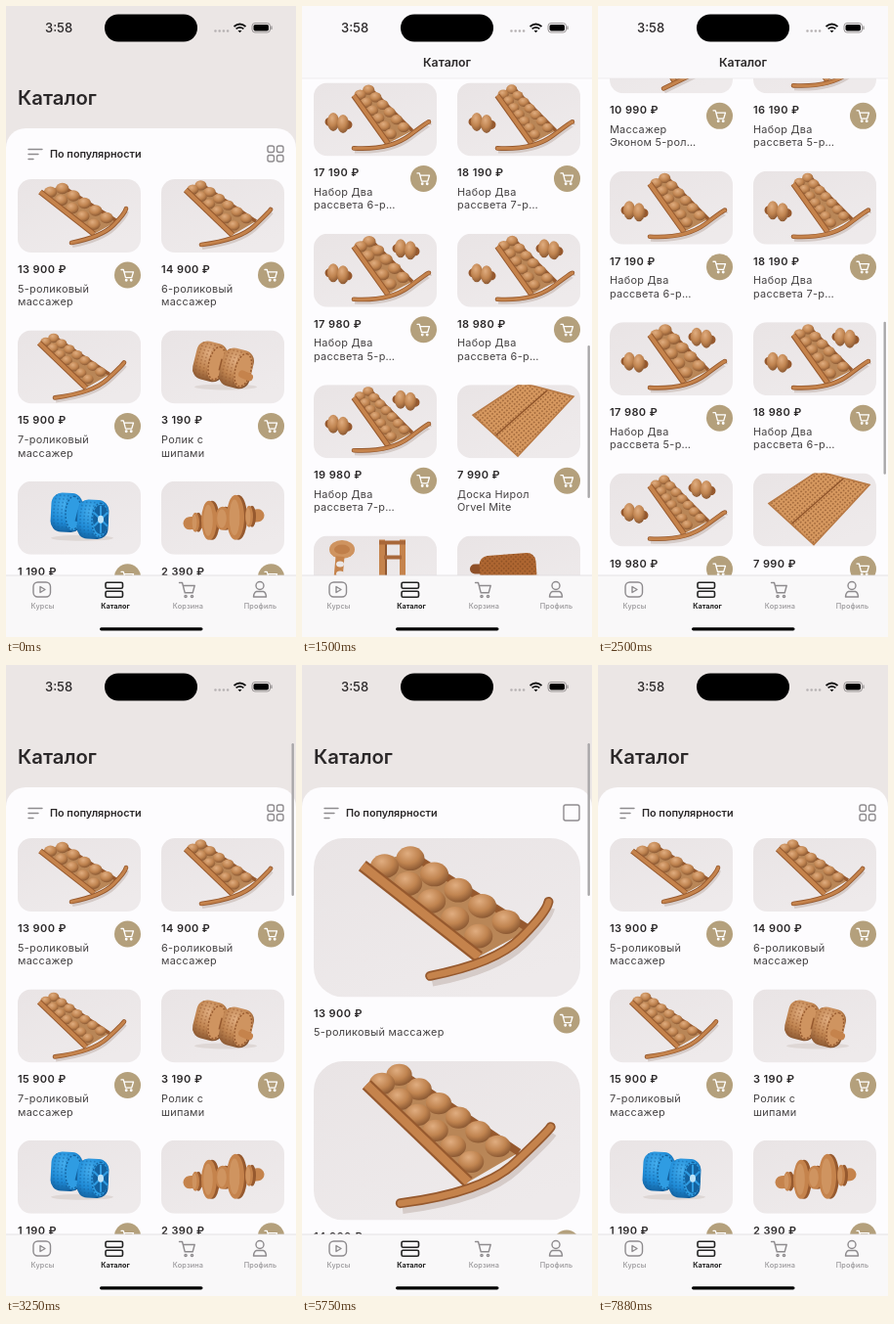
These frames come from a looping animation (297x645 px, 8000 ms). An HTML page:

```html
<!DOCTYPE html>
<html lang="ru">
<head>
<meta charset="utf-8">
<title>Каталог</title>
<style>
html, body { margin: 0; width: 100%; height: 100%; overflow: hidden; background: #fdfcfe; }
svg { display: block; width: 100vw; height: 100vh; }
text { font-family: Inter, "Noto Sans", sans-serif; fill: #2b2829; }
.price { font-size: 11px; font-weight: 600; letter-spacing: .4px; }
.name { font-size: 10.9px; letter-spacing: .28px; fill: #454243; }
.tab { font-size: 7.3px; font-weight: 500; letter-spacing: .15px; text-anchor: middle; fill: #979598; }
.tab.on { font-weight: 700; fill: #222; letter-spacing: 0; }
.icon { fill: none; stroke: #8e8b8e; stroke-width: 1.4; stroke-linecap: round; stroke-linejoin: round; }
.icon.on { stroke: #222; stroke-width: 1.6; }
</style>
</head>
<body>
<svg viewBox="0 0 297 645">
  <defs>
    <clipPath id="clip"><rect width="126" height="75" rx="14"/></clipPath>
    <linearGradient id="photo" x2=".6" y2="1"><stop stop-color="#e9e4e5"/><stop offset="1" stop-color="#eeeaeb"/></linearGradient>
    <radialGradient id="wood" cx=".4" cy=".3" r=".75"><stop stop-color="#e0ad80"/><stop offset=".55" stop-color="#c08450"/><stop offset="1" stop-color="#84532f"/></radialGradient>
    <radialGradient id="blue" cx=".4" cy=".3" r=".75"><stop stop-color="#45aeee"/><stop offset=".6" stop-color="#1f8bd6"/><stop offset="1" stop-color="#115c99"/></radialGradient>
    <pattern id="dots" width="3.4" height="3.4" patternUnits="userSpaceOnUse" patternTransform="rotate(-40)"><circle cx="1.7" cy="1.7" r=".95" fill="#74401b" opacity=".6"/></pattern>
    <g id="cart"><circle r="13.5" fill="#b4a07c"/><g fill="none" stroke="#fff" stroke-width="1.3" stroke-linecap="round" stroke-linejoin="round"><path d="M-6.5-5.5h2.3L-2 2.7h6.2L6-3.2h-9.5"/><circle cx="-1.3" cy="5.3" r=".8"/><circle cx="3.7" cy="5.3" r=".8"/></g></g>
  </defs>
  <rect width="297" height="645" fill="#ebe6e5"/>
  <g id="page">
    <text x="12" y="101" font-size="20.3" font-weight="600">Каталог</text>
    <rect y="125" width="297" height="2600" rx="20" fill="#fdfcfe"/>
    <path class="icon" d="M23 146.500h14M23 151.500h10M23 156.500h5"/>
    <text x="45" y="155" font-size="10.800" font-weight="600">По популярности</text>
    <g id="grid"></g><g id="big"></g><g id="list"></g>
  </g>
  <g id="nav">
    <rect width="297" height="74" fill="#faf9fb"/>
    <path d="M0 74h297" stroke="#e4e2e5" stroke-width=".6"/>
    <text x="148.500" y="62" font-size="12.300" font-weight="600" text-anchor="middle">Каталог</text>
  </g>
  <rect id="thumb" x="292.500" width="2.400" height="156" rx="1.200" fill="#a9a7a9"/>
  <text x="40" y="27" font-size="13" font-weight="500">3:58</text>
  <rect x="101" y="8.500" width="95" height="28" rx="14"/>
  <path d="M214.500 25.500h14" stroke="#b5b1b2" stroke-width="2.600" stroke-linecap="round" stroke-dasharray="0 4.200"/>
  <g fill="none" stroke="#111" stroke-width="1.800"><path d="M233.500 21q6-5 12 0M235.600 23.400q3.900-3 7.800 0"/><path d="M237.500 25l2 2.200 2-2.200z" fill="#111" stroke="none"/></g>
  <rect x="252" y="17.500" width="18.500" height="9.500" rx="3" fill="none" stroke="#8f8b8c" stroke-width=".9"/>
  <rect x="253.500" y="19" width="15.500" height="6.500" rx="1.800"/>
  <path d="M272 20.500v3.500" stroke="#8f8b8c" stroke-width="1.200"/>
  <rect y="582" width="297" height="63" fill="#f9f8f9"/>
  <path d="M0 582h297" stroke="#dddbdd" stroke-width=".8"/>
  <rect class="icon" x="28" y="589" width="17.500" height="15" rx="4.500"/>
  <path class="icon" d="M35 593.500v6l5-3z"/>
  <g class="icon on"><rect x="102" y="589.300" width="17.500" height="6" rx="1.500"/><rect x="102" y="598.300" width="17.500" height="6" rx="1.500"/></g>
  <g class="icon"><path d="M177.500 589.500h3l2.700 10.200h8l2-7.200h-12"/><circle cx="184" cy="603.500" r="1.100"/><circle cx="190.500" cy="603.500" r="1.100"/></g>
  <g class="icon"><circle cx="260" cy="592.500" r="4"/><path d="M256.500 598.500h7q2.800 1 3 5.500h-13q.2-4.500 3-5.500z"/></g>
  <text class="tab" x="37.500" y="616">Курсы</text>
  <text class="tab on" x="112" y="616">Каталог</text>
  <text class="tab" x="186.500" y="616">Корзина</text>
  <text class="tab" x="260.500" y="616">Профиль</text>
  <rect x="96" y="635.200" width="105.500" height="3.300" rx="1.650"/>
</svg>
<script>
const $ = id => document.getElementById(id);
const WOOD = { fill: 'url(#wood)', rail: '#c5834c', dark: '#96592e', face: '#cf9460', floor: '#b98657' };
const BLUE = { fill: 'url(#blue)', rail: '#2f9bdc', dark: '#14629f', face: '#2f9ce2', floor: '#cfe2ee' };

const stroke = (d, color, width, extra = '') =>
  `<path d="${d}" fill="none" stroke="${color}" stroke-width="${width}" ${extra}/>`;
const ROUND = 'stroke-linecap="round"';
const oval = (x, y, rx, ry, fill, extra = '') =>
  `<ellipse cx="${x}" cy="${y}" rx="${rx}" ry="${ry}" fill="${fill}" ${extra}/>`;
const move = (x, y, art) => `<g transform="translate(${x} ${y})">${art}</g>`;
const mix = (a, b, t) => a + (b - a) * t;

// Two rails with pairs of balls between them and a crossbar at the lower end.
const WIDE = { near: [23, 13, 78, 56], far: [45, 7, 102, 43], bar: 'M55 65Q86 59 98 47T111 30' };
const SLIM = { near: [25, 11, 73, 57], far: [39, 4, 97, 43], bar: 'M41 67Q80 62 95 48T112 31' };
const KIT = { near: [41, 13, 76, 62], far: [56, 4, 101, 49], bar: 'M41 67Q78 69 98 54T118 40' };
const PLAIN = { near: [36, 7, 67, 64], far: [54, 3, 89, 52], bar: 'M55 70L98 49' };
function board(n, { near, far, bar }, c = WOOD, filler = c.fill) {
  const rail = ([a, b, x, y]) => `M${a} ${b}L${x} ${y}`;
  const r = 2.6 + 18 / n;
  let balls = '';
  for (let i = 0; i < n; i++) for (const side of [.8, .25]) {
    const t = (i + .45) / n;
    const at = k => mix(mix(near[k], near[k + 2], t), mix(far[k], far[k + 2], t), side);
    balls += oval(at(0), at(1) - 2, r * 1.08, r * .92, filler);
  }
  const floor = `<path d="${rail(near)}L${far[2]} ${far[3]}L${far[0]} ${far[1]}z" fill="${c.floor}"/>`;
  return stroke(bar, '#d5cbc8', 4, 'transform="translate(1 3)"') + floor +
    stroke(rail(far), c.dark, 3.5) + balls + stroke(rail(near), c.dark, 6) +
    stroke(rail(near), c.rail, 4) + stroke(bar, c.dark, 4.6, ROUND) + stroke(bar, c.rail, 3, ROUND);
}

const roller = (x, y, c = WOOD) => stroke(`M${x - 9} ${y - 1}L${x + 10} ${y + 2}`, c.dark, 9, ROUND) +
  oval(x - 5, y - 1, 6, 9.5, c.fill) + oval(x + 5, y + 1, 6, 9.5, c.fill);

const kit = (n, extra, c, filler) => board(n, KIT, c, filler) +
  roller(25, 41, c) + (extra ? roller(94, 16, c) : '');

const wheel = (x, y, c, turn) => `<g transform="translate(${x} ${y}) rotate(${turn})">
  <rect x="-16" y="-20" width="32" height="40" rx="11" fill="${c.fill}"/>
  ${[-11, -7, -3, 1].map(k => stroke(`M${k} -18Q${k - 4} 0 ${k} 18`, c.dark, 1.6, 'stroke-dasharray="1.6 2" opacity=".5"')).join('')}
  ${oval(7, 0, 9, 18, c.face)}${stroke('M7-17A8 17 0 0 1 7 17A8 17 0 0 1 7-17', c.dark, 1.4, 'stroke-dasharray="2 1.6"')}</g>`;

const spiked = (c, turn) => oval(66, 58, 32, 3, '#ded7d5') + wheel(50, 32, c, turn) +
  stroke('M60 35L72 38', c.dark, 12) + wheel(77, 39, c, turn) +
  (c === BLUE
    ? oval(85, 39, 8, 15, c.dark) + stroke('M85 25V53M78 32L92 46M92 32L78 46', c.face, 2) + oval(85, 39, 3, 4, '#bfe3f7')
    : stroke('M83 45L90 48', c.rail, 8, ROUND));

const disc = (x, y, rx, ry) => oval(x + 2, y, rx, ry, WOOD.dark) + oval(x - 1, y, rx, ry, WOOD.rail) +
  oval(x - 2, y, rx * .6, ry * .8, WOOD.face);
const discs = stroke('M29 43L99 35', WOOD.rail, 13, ROUND) +
  [[36, 42, 4, 10], [50, 40, 8, 20], [64, 38, 8, 12], [77, 37, 9, 23], [91, 36, 4, 11]].map(d => disc(...d)).join('');

const relief = `<rect width="126" height="75" fill="${WOOD.dark}"/><g transform="rotate(12 63 38)">` +
  [8, 34, 62, 92, 118].map((x, i) => disc(x, 36 - i % 2 * 6, 15, 40)).join('') + '</g>';

const panel = 'M16 31L66-2L119 12L62 73Z';
const nails = `<path d="${panel}" fill="#d6985f"/><path d="${panel}" fill="url(#dots)"/>` +
  stroke('M39 52L93 5', '#8b5027', 1.2) + stroke(panel, '#b87a46', 1.6);

const stand = oval(29, 14, 13, 9.5, '#cf9460') + oval(29, 14, 8, 5, '#c07f4a') + stroke('M27 21L24 55', '#c5834c', 9) +
  [29, 39, 49].map(y => oval(27, y, 4, 3, '#ebe6e5')).join('') +
  stroke('M70 4V68M91 4V66', '#c5834c', 6) + stroke('M74 6V66', '#8f5730', 2) + stroke('M67 7H94M72 22H90M66 62H97', '#a9683a', 4);

const feet = stroke('M18 34H30', '#8f5028', 10, ROUND) +
  `<g transform="rotate(-4 50 34)"><rect x="23" y="19" width="58" height="30" rx="9" fill="#ae6631"/><rect x="23" y="19" width="58" height="30" rx="9" fill="url(#dots)"/></g>` +
  oval(80, 46, 12, 6, '#cb8f5a') + oval(102, 47, 13, 6, '#bf814b') + oval(80, 45, 4, 2, '#ead0b4') + oval(102, 46, 5, 2, '#ead0b4');

// Price, title with grid line break, picture.
const items = [
  ['13 900', '5-роликовый|массажер', board(5, WIDE)],
  ['14 900', '6-роликовый|массажер', board(6, SLIM)],
  ['15 900', '7-роликовый|массажер', move(-3, 2, board(7, SLIM))],
  ['3 190', 'Ролик с|шипами', spiked(WOOD, 14)],
  ['1 190', 'Ролик с|шипами из…', spiked(BLUE, 3)],
  ['2 390', 'Фигурный|ролик', discs],
  ['2 190', 'Гладкий|ролик', discs],
  ['2 590', 'Ролик|двойной', spiked(WOOD, 14)],
  ['2 790', 'Рельефный|ролик', relief],
  ['11 990', 'Комплект|пластик “Два…', move(12, 0, kit(5, false, BLUE, '#e4eef4'))],
  ['10 990', 'Массажер|Эконом 5-рол…', board(5, PLAIN)],
  ...[['16 190', 5], ['17 190', 6], ['18 190', 7], ['17 980', 5], ['18 980', 6], ['19 980', 7]]
    .map(([price, n], i) => [price, `Набор Два|рассвета ${n}-р…`, kit(n, i > 2)]),
  ['7 990', 'Доска Нирол|Orvel Mite', nails],
  ['2 990', 'Стойка для|хранения', stand],
  ['2 390', 'Массажер для|стоп и тела', feet],
  ['3 490', 'Ролик|для спины', discs],
  ['4 990', 'Массажер|для шеи', board(5, PLAIN)],
];

const photo = (art, x, y, w) => `<g transform="translate(${x} ${y}) scale(${w / 126})" clip-path="url(#clip)">
  <rect width="126" height="75" fill="url(#photo)"/>${art}</g>`;
const price = (value, x, y) => `<text class="price" x="${x}" y="${y}">${value} ₽</text>`;
const names = (lines, x, y) => lines.map((s, i) => `<text class="name" x="${x}" y="${y + i * 13.6}">${s}</text>`).join('');
const cart = (x, y) => `<use href="#cart" x="${x}" y="${y}"/>`;
const boxes = list => `<g class="icon">${list.map(([x, y, w, h]) =>
  `<rect x="${x}" y="${y}" width="${w}" height="${h}" rx="2"/>`).join('')}</g>`;

$('grid').innerHTML = boxes([[268, 143, 6.5, 6.5], [277.5, 143, 6.5, 6.5], [268, 152.5, 6.5, 6.5], [277.5, 152.5, 6.5, 6.5]]) +
  items.map(([cost, title, art], i) => {
    const x = i % 2 ? 159 : 12, y = 177 + (i >> 1) * 154.4;
    return photo(art, x, y, 126) + price(cost, x, y + 96) + names(title.split('|'), x, y + 115.5) + cart(x + 112.5, y + 98);
  }).join('');

$('big').innerHTML = boxes([[268, 143, 16, 16]]) +
  items.slice(0, 3).map(([cost, title, art], i) => {
    const y = 177 + i * 228;
    return photo(art, 12, y, 273) + price(cost, 12, y + 183) + names([title.replace('|', ' ')], 12, y + 202) + cart(271, y + 186);
  }).join('');

$('list').innerHTML = boxes([[268, 143, 16, 6.5], [268, 152.5, 16, 6.5]]) +
  items.slice(0, 5).map(([cost, title, art], i) => {
    const y = 189 + i * 90.9;
    const twoLines = i === 4;
    const lines = twoLines ? ['Ролик с шипами', 'из пластика'] : [title.replace('|', ' ')];
    return photo(art, 12, y, 111) + names(lines, 132, y + (twoLines ? 15.5 : 22.5)) + price(cost, 132, y + 57) +
      cart(271, y + 53) + stroke(`M12 ${y + 78.5}H285`, '#e3e1e3', .8);
  }).join('');

const LOOP = 8000, STEP = 125;
const views = [[0, 'grid'], [3625, 'big'], [4500, 'list'], [5125, 'grid'], [5750, 'big'], [6500, 'list'], [7375, 'grid']];

function scrollAt(t) {
  const fling = time => 1228 * (1 - Math.exp(-(time - 690) / 450));
  if (t < 750 || t >= 3250) return 0;
  return t < 2400 ? fling(t) : fling(2400) * (1 - (t - 2400) / 850) ** 2;
}

function draw(now) {
  const t = Math.floor(now % LOOP / STEP) * STEP;
  const scroll = scrollAt(t);
  const view = views.findLast(([start]) => t >= start)[1];
  for (const id of ['grid', 'big', 'list']) $(id).style.display = id === view ? '' : 'none';
  $('page').setAttribute('transform', `translate(0 ${-scroll})`);
  $('nav').setAttribute('opacity', Math.min(1, Math.max(0, (scroll - 30) / 30)));
  $('thumb').setAttribute('y', 80 + Math.max(0, scroll * .2687 - 8.5));
  $('thumb').setAttribute('opacity', t < 750 || t >= 7625 ? 0 : t < 7500 ? 1 : .5);
}

const begin = performance.now();
function tick() {
  draw(performance.now() - begin);
  requestAnimationFrame(tick);
}
tick();
</script>
</body>
</html>
```
